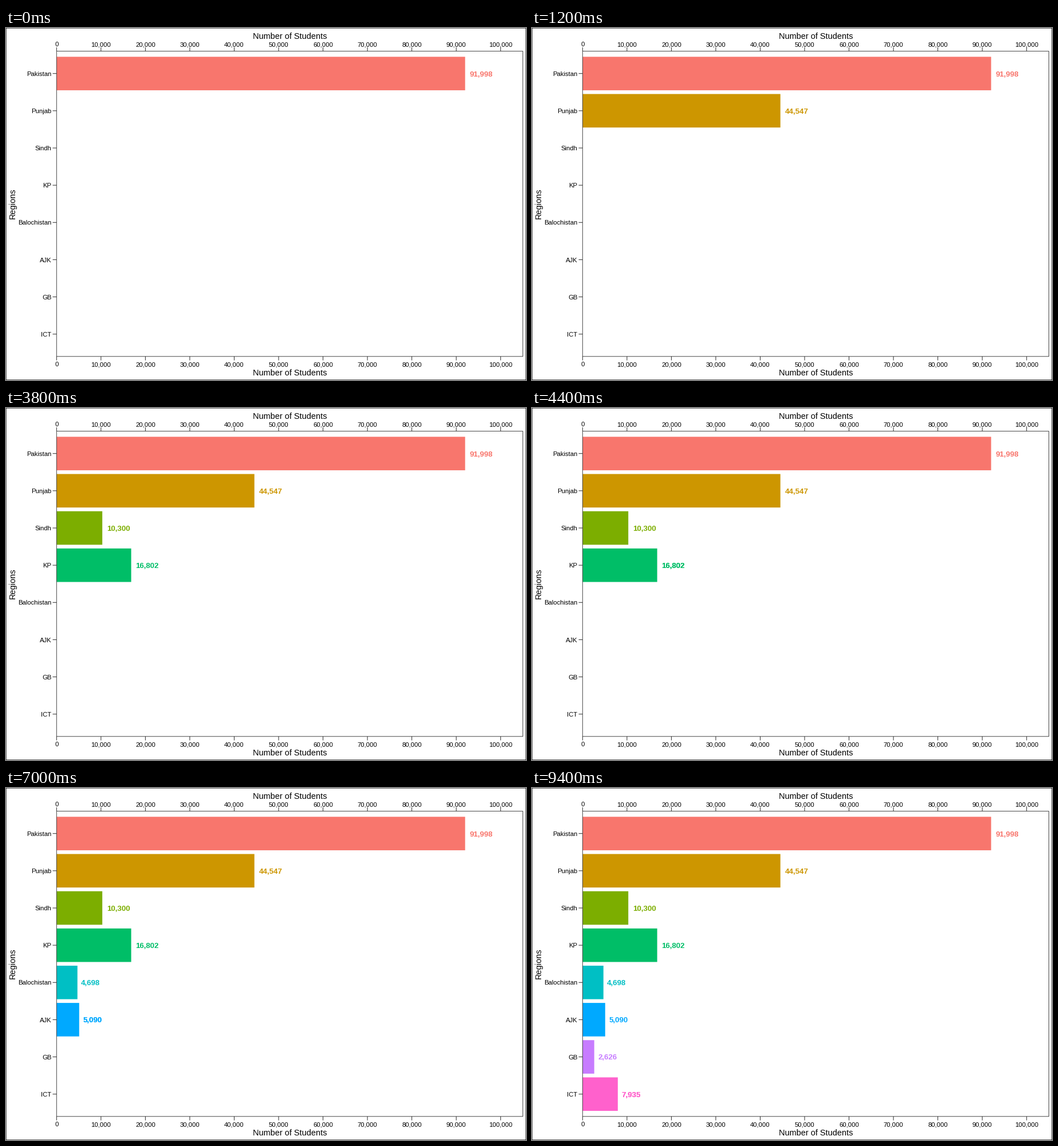
A matplotlib script that plays this animation: 908x616 px, repeating every 10 s.

```python
import matplotlib.pyplot as plt
from matplotlib.animation import FuncAnimation
from matplotlib.patches import Rectangle

W, H, DPI = 908, 616, 100
PT = 72 / DPI  # points per pixel
INTERVAL, FRAMES = 100, 100

LEFT, RIGHT, TOP, BOTTOM = 88.3, 902.5, 40.6, 574.8
X_SCALE = (RIGHT - LEFT) / 105000
Y_STEP = (BOTTOM - TOP) / 8.2
Y0 = TOP + 0.6 * Y_STEP
BAR_HEIGHT = 0.9 * Y_STEP
TICK = 6.8
TICK_SIZE, LABEL_SIZE, TITLE_SIZE = 11.3, 13.3, 14.5

# region, students, colour, frame of entry, frame of the heavier label
REGIONS = [
    ("Pakistan", 91998, "#F8766D", 0, 5),
    ("Punjab", 44547, "#CD9600", 12, 18),
    ("Sindh", 10300, "#7CAE00", 25, 31),
    ("KP", 16802, "#00BE67", 38, 44),
    ("Balochistan", 4698, "#00BFC4", 51, 57),
    ("AJK", 5090, "#00A9FF", 64, 70),
    ("GB", 2626, "#C77CFF", 76, 82),
    ("ICT", 7935, "#FF61CC", 88, 94),
]

plt.rcParams["font.family"] = "Liberation Sans"
fig = plt.figure(figsize=(W / DPI, H / DPI), dpi=DPI, facecolor="white")
ax = fig.add_axes([0, 0, 1, 1])
ax.set_xlim(0, W)
ax.set_ylim(H, 0)
ax.axis("off")


def line(xs, ys):
    ax.plot(xs, ys, color="#222222", lw=0.95 * PT, snap=False,
            solid_capstyle="butt", zorder=3)


def text(x, y, s, size, **kw):
    kw = {"ha": "center", "va": "baseline", "color": "black", **kw}
    return ax.text(x, y, s, fontsize=size * PT, **kw)


def outline(x0, y0, x1, y1, color, width):
    ax.add_patch(Rectangle((x0, y0), x1 - x0, y1 - y0, fill=False, ec=color,
                           lw=width * PT, snap=False, zorder=4))


def draw_axes():
    # the outer line sits on the stage edge, so only its inner half shows
    outline(0, 0, W, H, "black", 1.2)
    outline(LEFT, TOP, RIGHT, BOTTOM, "#333333", 0.9)
    for value in range(0, 100001, 10000):
        x = LEFT + value * X_SCALE
        line([x, x], [TOP - TICK, TOP])
        line([x, x], [BOTTOM, BOTTOM + TICK])
        text(x, 32, f"{value:,}", TICK_SIZE)
        text(x, 592, f"{value:,}", TICK_SIZE)
    middle = (LEFT + RIGHT) / 2
    for y in (19, 608):
        text(middle, y, "Number of Students", TITLE_SIZE)
    text(16, 307.6, "Regions", TITLE_SIZE, rotation=90,
         rotation_mode="anchor")


def draw_region(index, name, value, color):
    y = Y0 + index * Y_STEP
    line([LEFT - TICK, LEFT], [y, y])
    text(79.3, y + 4.2, name, TICK_SIZE, ha="right")
    width = value * X_SCALE
    bar = ax.add_patch(Rectangle((LEFT, y - BAR_HEIGHT / 2), width, BAR_HEIGHT,
                                 fc=color, lw=0, snap=False, zorder=2))
    label = f"{value:,}"
    # two copies: overprinting makes the glyph edges slightly heavier
    copies = [text(LEFT + width + 1.3 * len(label), y + 4.9, label, LABEL_SIZE,
                   ha="left", color=color, weight="bold") for _ in range(2)]
    return bar, *copies


draw_axes()
groups = [draw_region(i, *region[:3]) for i, region in enumerate(REGIONS)]
ends = [region[3] for region in REGIONS[1:]] + [FRAMES]


def update(frame):
    for (bar, label, overprint), region, end in zip(groups, REGIONS, ends):
        start, heavy = region[3:]
        bar.set_visible(frame >= start)
        label.set_visible(frame >= start)
        overprint.set_visible(heavy <= frame < end)
    return [artist for group in groups for artist in group]


anim = FuncAnimation(fig, update, frames=FRAMES, interval=INTERVAL,
                     init_func=lambda: update(0), repeat=True, repeat_delay=0,
                     blit=False)
plt.show()
```
